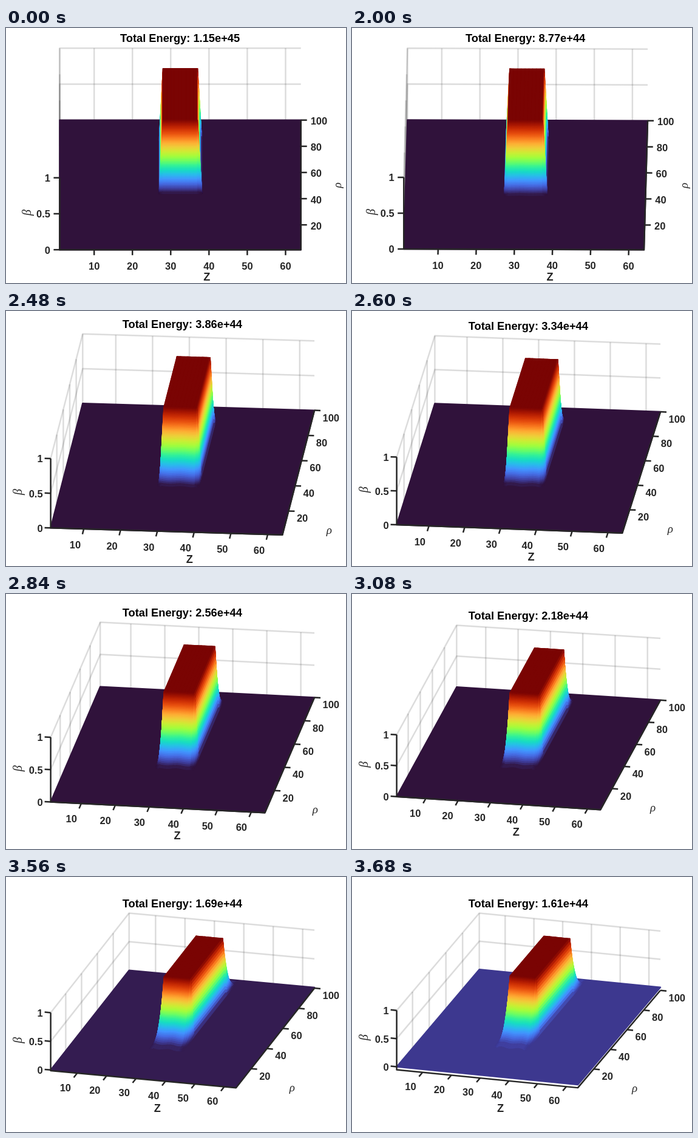
An HTML page with a canvas that plays this animation: 560x420 px, repeating every 3740 ms.

```html
<!DOCTYPE html>
<html lang="en">
<head>
<meta charset="utf-8">
<title>Rotating surface plot</title>
<style>
  html, body { margin: 0; width: 100%; height: 100%; overflow: hidden; background: #fff; }
  canvas { display: block; width: 560px; height: 420px; }
</style>
</head>
<body>
<canvas id="plot" width="560" height="420"></canvas>
<script>
const ctx = document.getElementById('plot').getContext('2d');

const HOLD = 2000, STEP = 60, STEPS = 29, LOOP = HOLD + STEP * STEPS;
const LABEL_SWITCH = 8;            // step at which the labels change sides
const TURN = 0.558 * Math.PI / 180; // azimuth per step
const SIN_EL = Math.sin(Math.PI / 9), BETA = 20 * Math.cos(Math.PI / 9);
const LEFT = 73.6;
const INK = '#262626', GRID = 'rgba(38,38,38,.16)';
const SANS = '"Liberation Sans", Arial, sans-serif';
const SERIF = '"Liberation Serif", "Times New Roman", serif';

// Colour map stops (0..1), evenly spaced
const MAP = [
  [.19, .072, .232], [.251, .252, .634], [.276, .421, .891], [.259, .58, .999],
  [.158, .736, .923], [.093, .866, .762], [.197, .949, .595], [.428, .994, .386],
  [.644, .99, .234], [.805, .925, .205], [.933, .812, .227], [.993, .674, .203],
  [.98, .491, .13], [.91, .317, .061], [.807, .187, .021], [.657, .084, .006],
  [.48, .016, .011]
];

// Energy (1e44) at chosen steps
const ENERGY = [[0, 11.5], [1, 8.77], [6, 4.97], [11, 3.34], [15, 2.56], [24, 1.82], [29, 1.61]];

const mix = (a, b, t) => a + (b - a) * t;

function color(x) {
  const p = Math.max(0, Math.min(1, x)) * (MAP.length - 1);
  const n = Math.min(MAP.length - 2, Math.floor(p));
  const c = MAP[n].map((v, j) => Math.round(255 * mix(v, MAP[n + 1][j], p - n)));
  return `rgb(${c})`;
}

function energy(step) {
  let n = 0;
  while (n < ENERGY.length - 2 && step >= ENERGY[n + 1][0]) n++;
  const [a, ea] = ENERGY[n], [b, eb] = ENERGY[n + 1];
  const t = (Math.sqrt(step) - Math.sqrt(a)) / (Math.sqrt(b) - Math.sqrt(a));
  return (1e44 * Math.exp(mix(Math.log(ea), Math.log(eb), t))).toExponential(2);
}

function path(points) {
  ctx.beginPath();
  points.forEach(p => ctx.lineTo(p[0], p[1]));
}

function line(style, ...points) {
  path(points);
  ctx.strokeStyle = style;
  ctx.lineWidth = 2.5;
  ctx.stroke();
}

// Filled polygon with an outline of the same colour
function patch(points, fill, outline) {
  path(points);
  ctx.closePath();
  ctx.fillStyle = ctx.strokeStyle = fill;
  ctx.lineWidth = outline;
  ctx.fill();
  ctx.stroke();
}

function text(str, x, y, size, align, fill = INK) {
  ctx.font = `bold ${size}px ${SANS}`;
  ctx.textAlign = align;
  ctx.fillStyle = fill;
  ctx.fillText(str, x, y + size * 0.36);
}

function greek(str, x, y, size, angle) {
  ctx.save();
  ctx.translate(x, y);
  ctx.rotate(angle);
  ctx.font = `italic ${size}px ${SERIF}`;
  ctx.textAlign = 'center';
  ctx.fillStyle = INK;
  const m = ctx.measureText(str);
  ctx.fillText(str, 0, (m.actualBoundingBoxAscent - m.actualBoundingBoxDescent) / 2);
  ctx.restore();
}

// Fit the rotated box into the axes area; returns a projection
function view(step, under) {
  const sin = Math.sin(step * TURN), cos = Math.cos(step * TURN);
  const late = step >= LABEL_SWITCH;
  const right = late ? 508 : 500.5 - 1.83 * step;
  const maxH = late ? 342 : 332;
  const cx = (LEFT + right) / 2, cy = late ? 203.3 : 199.2 + 0.15 * step;
  const high = SIN_EL * (63 * sin + 99 * cos) + BETA * (1 + under);
  const k = Math.min((right - LEFT) / (63 * cos + 99 * sin), maxH / high);
  const project = (z, rho, beta) => {
    const dz = z - 32.5, dr = rho - 50.5;
    return [
      cx + k * (dz * cos + dr * sin),
      cy + k * (SIN_EL * (dz * sin - dr * cos) - BETA * (beta - (1 - under) / 2))
    ];
  };
  return { project, late, cx, top: cy - k * high / 2 };
}

function drawWalls(P, low) {
  for (let z = 10; z <= 60; z += 10) line(GRID, P(z, 100, low), P(z, 100, 1));
  for (let r = 20; r <= 100; r += 20) line(GRID, P(1, r, low), P(1, r, 1));
  for (const b of [0.5, 1]) line(GRID, P(1, 1, b), P(1, 100, b), P(64, 100, b));
}

function drawSurface(P, step, under) {
  const shade = b => color((b + under) / (1 + under));
  patch([P(1, 1, 0), P(64, 1, 0), P(64, 100, 0), P(1, 100, 0)], shade(0), 2.4);

  // Columns: steep left side, flat middle, steep right side
  const cols = [], SIDE = 18;
  for (let n = 0; n < SIDE; n++) cols.push([27 + n / SIDE, n / SIDE]);
  for (let n = 0; n <= 9; n++) cols.push([28 + n, 1]);
  for (let n = 1; n <= SIDE; n++) cols.push([37 + 1.1 * n / SIDE, 1 - n / SIDE]);

  // Rows from back to front; the ramps widen and curve with time
  const width = 1 + 1.27 * Math.pow(step, 0.7);
  const power = 1 + 1.4 * step / STEPS;
  const front = 45 - Math.min(1, step / 5);
  const RAMP = 48, rows = [];
  const reach = level => width * (1 - Math.pow(level, 1 / power));
  for (let n = 0; n <= RAMP / 2; n++) rows.push([84.4, 2 * n / RAMP, 1]);
  for (let n = RAMP; n >= 0; n--) rows.push([front, n / RAMP, -1]);

  const ripple = step ? 0.05 : 0;
  const mesh = rows.map(([edge, level, side]) => cols.map(([z, f], j) => {
    const wave = 1 + ripple * Math.sin(j * 7.3 + step * 2.1);
    const beta = level * f;
    return { p: P(z, edge + side * reach(level) * wave, beta), beta };
  }));

  for (let r = 0; r < mesh.length - 1; r++) {
    for (let c = 0; c < cols.length - 1; c++) {
      const quad = [mesh[r][c], mesh[r][c + 1], mesh[r + 1][c + 1], mesh[r + 1][c]];
      const beta = quad.reduce((s, q) => s + q.beta, 0) / 4;
      patch(quad.map(q => q.p), shade(beta), 1.6);
    }
  }
}

function drawAxes(P, late, low) {
  const A = P(1, 1, low), B = P(64, 1, low), D = P(64, 100, low);
  const unit = (p, q) => {
    const d = Math.hypot(q[0] - p[0], q[1] - p[1]);
    return [(q[0] - p[0]) / d, (q[1] - p[1]) / d];
  };
  const along = unit(A, B), down = unit(D, B);
  const tick = (p, u, len) => line(INK, p, [p[0] + u[0] * len, p[1] + u[1] * len]);

  line(INK, P(1, 1, 1), A, B, D);

  for (let z = 10; z <= 60; z += 10) {
    const p = P(z, 1, low);
    tick(p, down, 9);
    text(z, p[0] + 14 * down[0] - (late ? 1.5 : 0), p[1] + 14 * down[1] + 12.5,
      16.5, late ? 'right' : 'center');
  }
  for (let r = 20; r <= 100; r += 20) {
    const p = P(64, r, low);
    tick(p, along, 10);
    text(r, p[0] + (late ? 13.5 : 16), p[1] + (late ? 12 : 1.5), 16.5, 'left');
  }
  for (const b of [0, 0.5, 1]) {
    const p = P(1, 1, b);
    tick(p, [-along[0], -along[1]], 10);
    text(b, p[0] - (late ? 13 : 15.5), p[1] + 0.5, 16.5, 'right');
  }

  text('Z', mix(A[0], B[0], 0.61) + 17 * down[0], mix(A[1], B[1], 0.61) + 44.5, 18.2, 'center');
  greek('β', A[0] - 52.5, P(1, 1, 0.5)[1] - 2, 20, -Math.PI / 2);
  if (late) greek('ρ', mix(B[0], D[0], 0.2) + 66.5, mix(B[1], D[1], 0.2) + 36.5, 19, 0);
  else greek('ρ', D[0] + 64, (B[1] + D[1]) / 2 + 0.5, 19, -Math.PI / 2);
}

function draw(step) {
  // Late in the run the values dip slightly below zero
  const under = 0.054 * Math.pow(Math.max(0, (step - 25) / 4), 2);
  const { project, late, cx, top } = view(step, under);
  ctx.fillStyle = '#fff';
  ctx.fillRect(0, 0, 560, 420);
  ctx.lineJoin = 'round';
  drawWalls(project, -under);
  drawSurface(project, step, under);
  drawAxes(project, late, -under);
  text('Total Energy: ' + energy(step), cx - 0.5, top - 16.5, 18.3, 'center', '#000');
}

let shown = -1;
const start = performance.now();
function tickFrame() {
  const t = (performance.now() - start) % LOOP;
  const step = t < HOLD ? 0 : Math.min(STEPS, 1 + Math.floor((t - HOLD) / STEP));
  if (step !== shown) draw(shown = step);
  requestAnimationFrame(tickFrame);
}
tickFrame();
</script>
</body>
</html>
```
